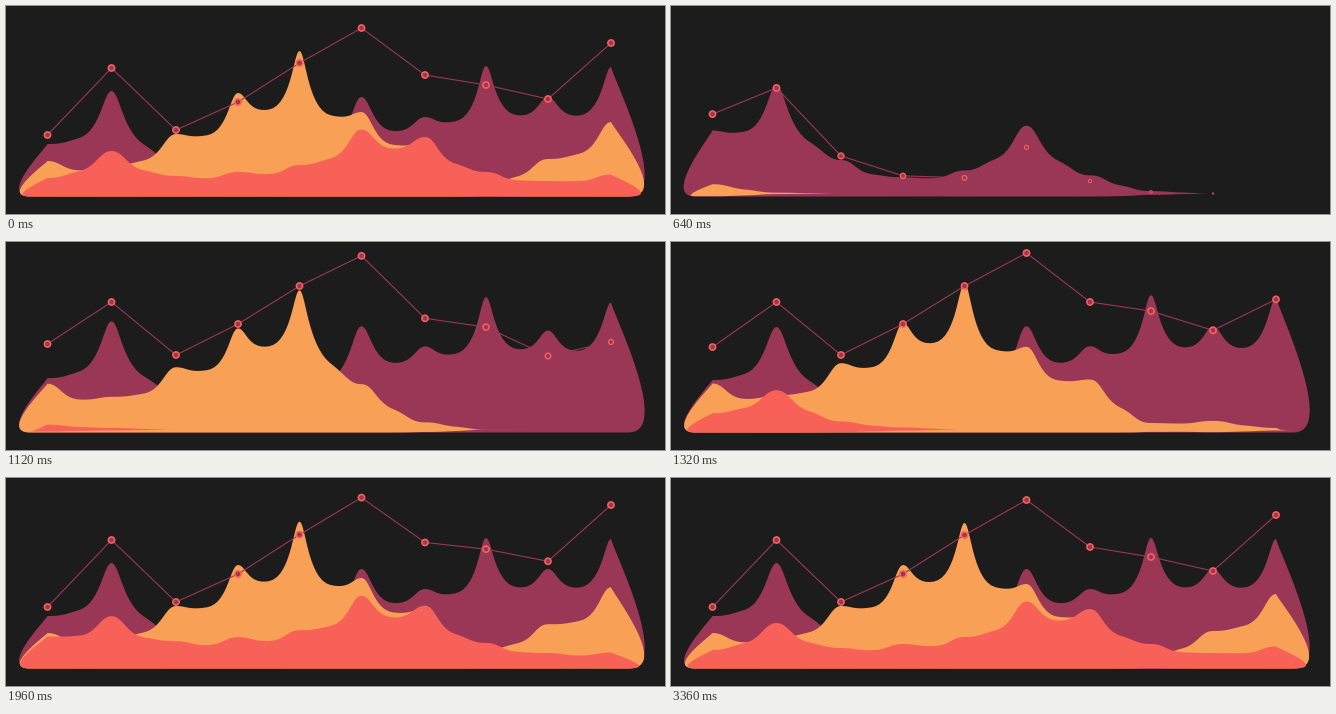
Write a matplotlib script that moves like this. It is 659x208 px and loops after 4.36 s.

```python
import numpy as np
import matplotlib.pyplot as plt
from matplotlib.animation import FuncAnimation
from matplotlib.patches import Polygon

W, H, DPI = 659, 208, 100
PX = 72 / DPI
STEP, LOOP = 40, 4360
BASE = 187.5
LAG = 86  # delay from one column to the next

BG, PLUM, ORANGE, CORAL = "#1c1c1c", "#9b3756", "#f8a055", "#f86157"
X = np.array([41.5, 105.5, 170, 232, 293.5, 355.5, 419, 480, 542, 605])
IDX = np.arange(len(X))

# start time, colour, column heights
AREAS = [
    (40, PLUM, np.array([49.5, 102.5, 30, 15, 23, 96.5, 76.5, 127.5, 96.5, 126.5])),
    (545, ORANGE, np.array([32.5, 27.5, 59.5, 100.5, 142.5, 81.5, 50, 9, 34.5, 71.5])),
    (1020, CORAL, np.array([15.5, 42.5, 17.5, 21.5, 28.5, 64, 56.5, 21.5, 12.5, 19])),
]
LIFT = np.where(IDX == 0, 13.5, 6.8)
LINE = np.array([58.5, 125.5, 63.5, 91.5, 130.5, 165.5, 118.5, 108.5, 94.5, 150.5])
LINE_LIFT = np.array([27, 2, 11, 14, 13, 11, 9, 10, 10, 10])


def smooth(v, a, b):
    u = np.clip((v - a) / (b - a), 0, 1)
    return u * u * (3 - 2 * u)


def grow(tau):
    u = np.clip((tau + 60) / 310, 0, 1) ** 1.5
    return u * u * (3 - 2 * u)


def area_heights(t, start, final):
    """Rise past the final height, hold, then settle."""
    tau = t - start - LAG * IDX
    lift = smooth(tau, 250, 600) * (1 - smooth(tau, 950, 1120))
    return final * grow(tau) + LIFT * lift


def line_heights(t):
    """Follow the first area, climb on past the final height, settle."""
    s = t - LAG * IDX
    start, _, first = AREAS[0]
    low = 0.68 * first
    climb = smooth(s, 310, 730)
    settle = smooth(s, 1230, 1660)
    return low * grow(s - start) + climb * (LINE + LINE_LIFT * (1 - settle) - low)


def bezier(p0, p1, p2, p3, n=16):
    u = np.linspace(0, 1, n)[:, None]
    p0, p1, p2, p3 = map(np.array, (p0, p1, p2, p3))
    return (1 - u)**3 * p0 + 3 * (1 - u)**2 * u * p1 + 3 * (1 - u) * u**2 * p2 + u**3 * p3


def floor(y):
    return BASE + 3 * (1 - np.exp(-np.maximum(BASE - y, 0) / 4))


def cap(x, h, side, reach):
    """Rounded end of an area, from the bottom up to the end point."""
    y = BASE - h
    low = floor(y)
    out = max(0, (reach - 85 / max(h, 1) - 6) / 0.444)
    shoulder = y + 0.1 * (low - y)
    return bezier((x + side * 17.5, low), (x + side * out, low),
                  (x + side * 3, shoulder), (x, y), 30)


def handles(h):
    near = np.clip(15 - 0.07 * h, 6, 15)
    return near, 29 - near


def crest(hs):
    """Peaked curve through the columns, sagging between them."""
    ys = BASE - hs
    parts = []
    for i in range(len(X) - 1):
        x0, x1, y0, y1 = X[i], X[i + 1], ys[i], ys[i + 1]
        mean = (hs[i] + hs[i + 1]) / 2
        xm, ym = (x0 + x1) / 2, BASE - mean * (0.8 - 0.0009 * mean)
        dy = y1 - y0
        r = max(0, (max(y0, y1) - ym) / max(abs(dy), 1e-6))
        slope = dy / (x1 - x0) * (0.25 + 1.2 * min(r, 0.5))
        a, b = handles(hs[i])
        parts.append(bezier((x0, y0), (x0 + a, y0), (xm - b, ym - slope * b), (xm, ym)))
        a, b = handles(hs[i + 1])
        parts.append(bezier((xm, ym), (xm + b, ym + slope * b), (x1 - a, y1), (x1, y1)))
    return np.vstack(parts)


def area_outline(hs):
    top = crest(hs)
    bottom = np.column_stack([top[:, 0], floor(top[:, 1])])[::-1]
    left = cap(X[0], hs[0], -1, 29.5)
    right = cap(X[-1], hs[-1], 1, 33.8)[::-1]
    return np.vstack([left, top, right, bottom])


fig = plt.figure(figsize=(W / DPI, H / DPI), dpi=DPI, facecolor=BG)
ax = fig.add_axes([0, 0, 1, 1])
ax.set_xlim(0, W)
ax.set_ylim(H, 0)
ax.axis("off")

areas = [ax.add_patch(Polygon([(0, 0), (1, 0), (1, 1)], fc=color, lw=0, zorder=k))
         for k, (_, color, _) in enumerate(AREAS)]
line, = ax.plot([], [], color=PLUM, lw=1.1 * PX, zorder=5)
dots = ax.scatter(X, X, s=1, c=PLUM, edgecolors=CORAL, zorder=6)


def draw(frame):
    t = frame * STEP if frame else LOOP
    for patch, (start, _, final) in zip(areas, AREAS):
        hs = area_heights(t, start, final)
        patch.set_visible(t > STEP and hs.max() > 0.3)
        patch.set_xy(area_outline(hs))

    ys = BASE - line_heights(t)
    s = t - LAG * IDX
    shown = s > 50
    line.set_data(X[shown], ys[shown])
    size = np.clip((s + 130) / 680, 0, 1) ** 0.6 * (t > STEP)
    dots.set_offsets(np.column_stack([X, ys]))
    dots.set_sizes((6.2 * size * PX) ** 2)
    dots.set_linewidths(1.6 * size * PX)
    return [*areas, line, dots]


anim = FuncAnimation(fig, draw, frames=LOOP // STEP, interval=STEP,
                     init_func=lambda: draw(0), repeat=True, repeat_delay=0)
plt.show()
```
